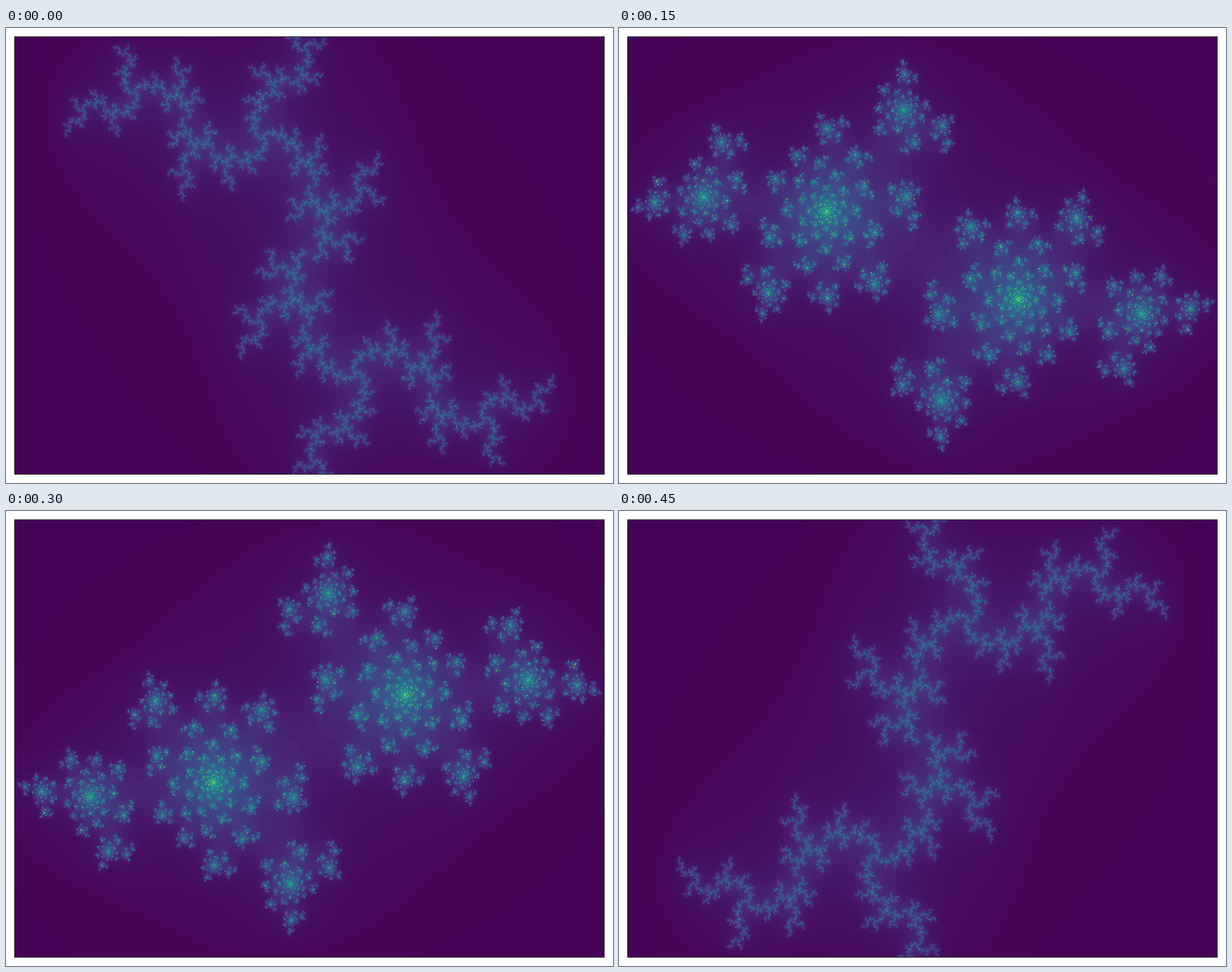
These frames come from a looping animation (800x600 px, 500 ms). An HTML page with a canvas:

```html
<!DOCTYPE html>
<html lang="en">
<head>
<meta charset="utf-8">
<title>Julia sets along a half circle</title>
<style>
html, body { margin: 0; width: 100%; height: 100%; overflow: hidden; background: #fff; }
canvas { display: block; }
</style>
</head>
<body>
<canvas id="stage" width="800" height="600"></canvas>
<script>
const FRAMES = 10, FRAME_MS = 50;
const RADIUS = 0.7885, MAX_ITER = 150;
const LEFT = 11, TOP = 12, WIDTH = 777, HEIGHT = 576;
const UNIT_X = 259.2, UNIT_Y = 288.8; // pixels per unit of the complex plane

const ctx = document.getElementById('stage').getContext('2d');

// Viridis, sampled at every tenth
const stops = '440154 482475 414487 355f8d 2a788e 21918c 22a884 44bf70 7ad151 bddf26 fde725'
  .split(' ').map(hex => [0, 2, 4].map(i => parseInt(hex.slice(i, i + 2), 16)));

function viridis(v) {
  const i = Math.min(Math.floor(v * 10), 9), part = v * 10 - i;
  return stops[i].map((a, k) => Math.round(a + (stops[i + 1][k] - a) * part));
}

const palette = Array.from({ length: MAX_ITER + 1 }, (_, n) => viridis(n / MAX_ITER));

function escapeTime(x, y, cx, cy) {
  let n = 0, xx = x * x, yy = y * y;
  while (n < MAX_ITER && xx + yy <= 4) {
    y = 2 * x * y + cy;
    x = xx - yy + cx;
    xx = x * x;
    yy = y * y;
    n++;
  }
  return n;
}

function juliaImage(angle) {
  const cx = RADIUS * Math.cos(angle), cy = RADIUS * Math.sin(angle);
  const image = ctx.createImageData(WIDTH, HEIGHT), data = image.data;
  let p = 0;
  for (let row = 0; row < HEIGHT; row++) {
    const y = (300 - TOP - row - 0.5) / UNIT_Y;
    for (let col = 0; col < WIDTH; col++) {
      const x = (LEFT + col + 0.5 - 400) / UNIT_X;
      const color = palette[escapeTime(x, y, cx, cy)];
      data[p++] = color[0];
      data[p++] = color[1];
      data[p++] = color[2];
      data[p++] = 255;
    }
  }
  return image;
}

// The constant c runs from a quarter turn to three quarters of a turn
const images = Array.from({ length: FRAMES }, (_, k) =>
  juliaImage(Math.PI * (0.5 + k / (FRAMES - 1))));

let shown = -1;

function draw() {
  const index = Math.floor(performance.now() / FRAME_MS) % FRAMES;
  if (index !== shown) {
    shown = index;
    ctx.fillStyle = '#fff';
    ctx.fillRect(0, 0, 800, 600);
    ctx.putImageData(images[index], LEFT, TOP);
    ctx.strokeStyle = 'rgba(0, 0, 0, 0.8)';
    ctx.strokeRect(11.5, 11.5, 777, 577);
  }
  requestAnimationFrame(draw);
}
draw();
</script>
</body>
</html>
```
